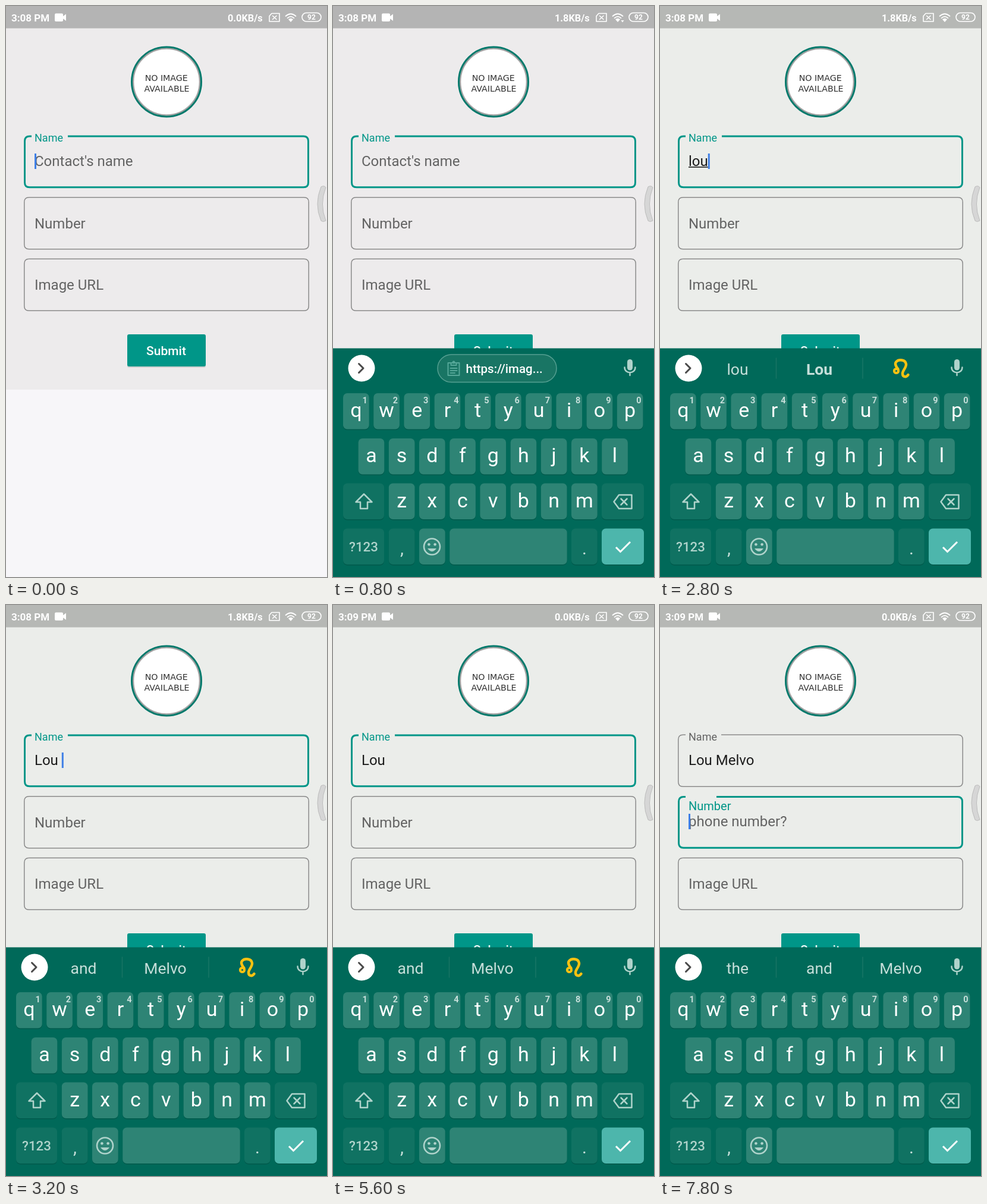
Animation, 540 px wide and 960 px high, one loop 8 s. Source, as an HTML page:

```html
<!DOCTYPE html>
<html lang="en">
<head>
<meta charset="utf-8">
<title>Contact form</title>
<style>
  html, body { margin: 0; width: 100%; height: 100%; overflow: hidden; background: #f7f6f9; }
  svg { display: block; width: 100vw; height: 100vh; }
  text { font-family: Roboto, sans-serif; white-space: pre; }
  .mid { text-anchor: middle; }
  .line { fill: none; stroke-linecap: round; stroke-linejoin: round; }
</style>
</head>
<body>
<svg id="stage" viewBox="0 0 540 960"></svg>
<script>
const LOOP = 8000;
const TEAL = '#009688', GREY = '#8b8b8b', HINT = '#636363', ICON = '#afd3cb', WORD = '#c6dfda';

// start, typed text, composing, three suggestions (none: clipboard chip)
const TYPING = [
  [0, '', false],
  [1800, 'l', true, 'l', 'like', 'leave'],
  [2200, 'lo', true, 'lo', 'love', 'look'],
  [2600, 'lou', true, 'lou', 'Lou', '*'],
  [3200, 'Lou ', false, 'and', 'Melvo', '*'],
  [5800, 'Lou Melvo ', false, 'the', 'and', 'Melvo']
];
const CARET_ON = [[0, 600], [1200, 1600], [1800, 3600], [4200, 4600], [5200, 5600],
  [5800, 6400], [6800, 7400], [7800, 8000]];

const text = (x, y, size, fill, str, extra = '') =>
  `<text x="${x}" y="${y}" font-size="${size}" fill="${fill}" ${extra}>${str}</text>`;
const mid = (x, y, size, fill, str, extra = '') => text(x, y, size, fill, str, `class="mid" ${extra}`);
const rect = (x, y, w, h, r, fill, extra = '') =>
  `<rect x="${x}" y="${y}" width="${w}" height="${h}" rx="${r}" fill="${fill}" ${extra}/>`;
const dot = (x, y, r, fill) => `<circle cx="${x}" cy="${y}" r="${r}" fill="${fill}"/>`;
const line = (d, stroke, width, extra = '') =>
  `<path class="line" d="${d}" stroke="${stroke}" stroke-width="${width}" ${extra}/>`;

// Outlined field; a notch leaves room for the floating label
function field(top, bottom, color, width, notchEnd) {
  const h = width / 2, l = 30 + h, r = 510 - h, t = top + h, b = bottom - h, c = 8;
  const start = notchEnd || l + c;
  const end = notchEnd ? 'H43' : '';
  return `<path d="M${start} ${t}H${r - c}Q${r} ${t} ${r} ${t + c}V${b - c}Q${r} ${b} ${r - c} ${b}
    H${l + c}Q${l} ${b} ${l} ${b - c}V${t + c}Q${l} ${t} ${l + c} ${t}${end}"
    fill="none" stroke="${color}" stroke-width="${width}"/>`;
}

function statusBar() {
  return rect(0, 0, 540, 37.5, 0, '#b4b4b4', 'id="bar"')
    + text(9, 25.5, 17, '#fff', '3:08 PM', 'id="clock" font-weight="700"')
    + rect(82, 12.5, 14, 13.5, 2, '#fff')
    + '<path d="M95 18L101 13.5V25L95 20.5Z" fill="#fff"/>'
    + text(373, 25.5, 16.3, '#fff', '0.0KB/s', 'id="speed" font-weight="700"')
    + line('M447 12.5H460V26H443V17Z', '#fff', 1.6)
    + line('M448.5 16.5L455 22.5M455 16.5L448.5 22.5', '#fff', 1.6)
    + line('M470.5 17Q479 9.5 487.5 17M473.5 20.3Q479 15.5 484.5 20.3', '#fff', 1.7)
    + '<path d="M475 22.5Q479 19 483 22.5L479 27Z" fill="#fff"/>'
    + '<path id="traffic" d="M484.5 24H489.5L487 27.5Z" fill="#fff"/>'
    + rect(498, 11.5, 32, 14.5, 7.2, 'none', 'stroke="#fff" stroke-width="1.6"')
    + mid(514, 23, 12, '#fff', '92', 'font-weight="700"');
}

function form() {
  const font = 'style="font-family:\'DejaVu Sans\',sans-serif"';
  return rect(0, 0, 540, 645, 0, '#edebec', 'id="page"') + statusBar()
    + '<circle cx="270" cy="127.5" r="56" fill="#fff" stroke="#a2a2a2" stroke-width="2.5"/>'
    + '<circle cx="270" cy="127.5" r="58.5" fill="none" stroke="#00796b" stroke-width="3"/>'
    + mid(269.7, 126, 14.2, '#333', 'NO IMAGE', font)
    + mid(270.5, 143.7, 14.2, '#333', 'AVAILABLE', font)
    + `<g id="nameFocus">${field(217.5, 306.2, TEAL, 3, 104)}
        ${text(48, 228, 18, TEAL, 'Name')}${field(321, 409.5, GREY, 1.5)}
        ${text(48, 373.5, 24, HINT, 'Number')}</g>`
    + `<g id="numberFocus">${field(217.5, 306, GREY, 1.5, 103)}
        ${text(48, 228, 18, HINT, 'Name')}${field(321, 409.7, TEAL, 3, 95)}
        ${text(48, 344.6, 20, TEAL, 'Number')}${text(48, 372, 24, HINT, 'phone number?')}</g>`
    + field(424.5, 513, GREY, 1.5) + text(48, 477, 24, HINT, 'Image URL')
    + text(48, 268.5, 24, HINT, "Contact's name", 'id="hint"')
    + text(48, 268.5, 24, '#1c1c1c', '', 'id="typed"')
    + rect(48, 270, 0, 1.6, 0, '#1c1c1c', 'id="under"')
    + rect(48, 248, 3, 26, 0, '#3f7fe6', 'id="caret"')
    + rect(204, 554, 132, 54, 3, '#cfcfcf')
    + rect(204, 552, 132, 54, 3, TEAL)
    + mid(269.5, 586.5, 21, '#fff', 'Submit', 'font-weight="500"')
    + '<path d="M530 304Q518 333 530 361Q533 364 538 361Q527 333 538 305Q535 301 530 304Z" fill="#d6d6d6" stroke="#bcbcbc"/>';
}

function key(x, y, w, fill = '#2e8475') {
  return rect(x, y + 1.5, w, 60.5, 7, '#005a4c') + rect(x, y, w, 60.5, 7, fill);
}

function letters(str, x, y, hints = '') {
  return [...str].map((ch, i) => {
    const left = x + i * 51.2;
    return key(left, y, 43.7) + mid(left + 21.8, y + 40, 34, '#fff', ch)
      + (hints ? mid(left + 36.7, y + 16.5, 14.5, WORD, hints[i], 'font-weight="700"') : '');
  }).join('');
}

function keyboard() {
  const dark = '#107262', clip = '#55a798';
  return rect(0, 575.5, 540, 385, 0, '#006959')
    + dot(48, 609, 22.5, '#fff')
    + line('M43.5 601.5L51 609L43.5 616.5', '#4a4a4a', 3)
    + rect(495, 594, 9, 18.5, 4.5, ICON)
    + line('M490.5 607.5C490.5 619 508.5 619 508.5 607.5M499.5 616.5V621', ICON, 2.4)
    + `<g id="chip">${rect(176, 586, 200, 46.5, 23.2, '#197564', 'stroke="#56a092" stroke-width="1.5"')}
        ${line('M193.5 600H212.5V621H193.5ZM198.5 600V604H207.5V600M197.5 609H208.5M197.5 613H208.5M197.5 617H205', clip, 2)}
        ${dot(203, 599, 2.5, clip)}
        ${text(223.5, 617, 20.5, '#fff', 'https://imag...', 'font-weight="500"')}</g>`
    + `<g id="words">${line('M195.5 592V626M341 592V626', '#187565', 1.5)}
        ${[130.5, 268, 405].map(x => mid(x, 619.5, 26.5, WORD, '')).join('')}
        <g id="sign"><circle cx="397.5" cy="613.5" r="3.6" fill="none" stroke="#fcc211" stroke-width="4"/>
        ${line('M400.5 610.5C396 605 394.5 601 397.5 598C402 593.5 413 594.5 414 602C414.5 608 408 613 408 618C408 624.5 414.5 624.5 417.5 620', '#fcc211', 4.4)}</g></g>`
    + letters('qwertyuiop', 17, 651, '1234567890')
    + letters('asdfghjkl', 42.6, 727)
    + letters('zxcvbnm', 93.8, 802.5)
    + key(17, 802.5, 69, dark) + key(452, 802.5, 71, dark)
    + line('M52 820.5L38.5 834H46V845H58V834H65.5Z', ICON, 2.5)
    + line('M481 822H502.5V845H481L472.5 833.5ZM484.5 828.5L494.500 838.5M494.5 828.5L484.5 838.5', ICON, 2.5)
    + key(17, 878.5, 69, dark) + key(93.8, 878.5, 43.7, dark) + key(145, 878.5, 43.7)
    + key(196.2, 878.5, 197.5) + key(401, 878.5, 43.7, dark) + key(452, 878.5, 71, '#4db6ac')
    + mid(51.5, 917, 22.3, ICON, '?123', 'font-weight="500"')
    + mid(116, 922, 30, WORD, ',') + mid(423, 921.5, 30, WORD, '.')
    + line('M180 909A13.5 13.5 0 1 1 153 909A13.5 13.5 0 1 1 180 909', ICON, 2.6)
    + `<path d="M159 912H174Q166.5 922 159 912Z" fill="${ICON}"/>`
    + dot(161.4, 905.3, 2.3, ICON) + dot(171.6, 905.3, 2.3, ICON)
    + line('M476 910L483.5 917.5L500 901', '#fff', 3, 'style="stroke-linecap:butt;stroke-linejoin:miter"');
}

const stage = document.getElementById('stage');
stage.innerHTML = form() + `<g id="keys">${keyboard()}</g>`;
const el = Object.fromEntries([...stage.querySelectorAll('[id]')].map(n => [n.id, n]));
const words = [...el.words.querySelectorAll('text')];
const show = (node, on) => node.setAttribute('visibility', on ? 'visible' : 'hidden');

function draw(now) {
  const t = now % LOOP;
  const [, typed, composing, ...tips] = TYPING.filter(s => s[0] <= t).pop();
  const onNumber = t >= 7800;
  const settled = t >= 1200;

  el.page.setAttribute('fill', settled ? '#ebedea' : '#edebec');
  el.bar.setAttribute('fill', settled ? '#b6b8b5' : '#b4b4b4');
  el.clock.textContent = t < 3400 ? '3:08 PM' : '3:09 PM';
  el.speed.textContent = t >= 600 && t < 4600 ? '1.8KB/s' : '0.0KB/s';
  show(el.traffic, t >= 600 && t < 2600);

  const rise = Math.min(1, Math.max(0, (t - 600) / 180));
  el.keys.setAttribute('transform', `translate(0 ${240 * (1 - rise) ** 3})`);
  show(el.keys, t >= 600);
  el.chip.style.display = tips.length ? 'none' : '';
  el.words.style.display = tips.length ? '' : 'none';
  words.forEach((w, i) => {
    w.textContent = tips[i] === '*' ? '' : tips[i] || '';
    w.setAttribute('font-weight', tips[i] === 'Lou' ? 700 : 400);
  });
  el.sign.style.display = tips[2] === '*' ? '' : 'none';

  show(el.nameFocus, !onNumber);
  show(el.numberFocus, onNumber);
  show(el.hint, !typed);
  el.typed.textContent = typed;
  const width = typed ? el.typed.getComputedTextLength() : 0;
  el.under.setAttribute('width', composing ? width : 0);
  el.caret.setAttribute('x', onNumber ? 48 : 48 + width);
  el.caret.setAttribute('y', onNumber ? 351 : 248);
  show(el.caret, CARET_ON.some(([a, b]) => t >= a && t < b));
}

const begin = performance.now();
function tick() {
  draw(performance.now() - begin);
  requestAnimationFrame(tick);
}
tick();
</script>
</body>
</html>
```
